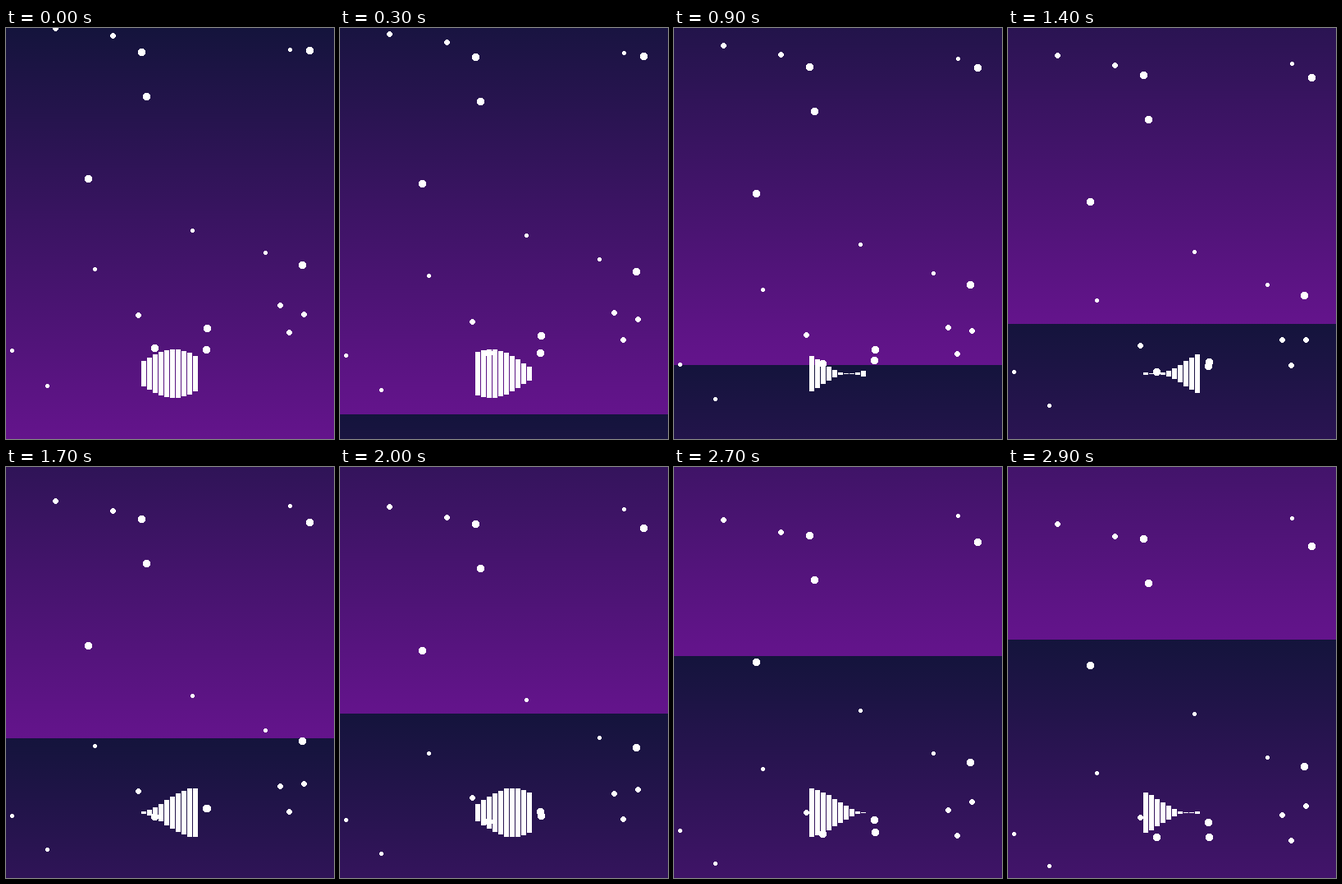
Recreate the animation shown at these times as an HTML page. Size 400 px wide and 500 px high, loop 3 s.

```html
<!DOCTYPE html>
<html lang="en">
<head>
<meta charset="utf-8">
<title>Night sky equalizer</title>
<style>
  html, body { margin: 0; width: 100%; height: 100%; overflow: hidden; background: #14143c; }
  svg { display: block; width: 400px; height: 500px; }
</style>
</head>
<body>
<svg viewBox="0 0 400 500" shape-rendering="crispEdges">
  <defs>
    <linearGradient id="sky" x1="0" y1="0" x2="0" y2="1">
      <stop offset="0" stop-color="rgb(20,20,60)"/>
      <stop offset="1" stop-color="rgb(100,20,140)"/>
    </linearGradient>
  </defs>
  <g id="back">
    <rect width="400" height="500" fill="url(#sky)"/>
    <rect y="500" width="400" height="500" fill="url(#sky)"/>
  </g>
  <g id="stars" fill="#fff"></g>
  <g id="bars" fill="#fff"></g>
</svg>
<script>
const STEP = 100, STEPS = 30;
const BARS = 10, PITCH = 7, MID = 420, SWING = 15;

// by radius: x, start y, fall per step
const STARS = {
  2: [[346, 26.4, 1.23], [227, 246.9, 1.84], [108, 293.6, 2.72],
      [316, 273.6, 2.77], [7, 392.7, 1.86], [50, 435.6, 1.73]],
  3: [[60, 0.4, 2.39], [130, 9.4, 2.59], [334, 337.5, 2.98],
      [363, 348.3, 2.2], [345, 370.5, 2.89], [161, 349.3, 2.65]],
  4: [[165, 29, 2], [171, 83, 2], [100, 183, 2], [181, 389.4, 2.1],
      [370, 27.2, 2.38], [361, 288.7, 2.62], [245, 365.7, 2.92], [244, 391.3, 1.42]]
};

const byId = id => document.getElementById(id);

function add(parent, tag, attrs) {
  const el = document.createElementNS("http://www.w3.org/2000/svg", tag);
  for (const key in attrs) el.setAttribute(key, attrs[key]);
  return parent.appendChild(el);
}

// Pixel disc built from one-pixel rows
function disc(r) {
  let d = "";
  for (let y = -r; y <= r; y++) {
    const w = Math.floor(Math.sqrt((r + 0.5) ** 2 - y * y));
    d += `M${-w} ${y}h${2 * w + 1}v1h${-2 * w - 1}z`;
  }
  return d;
}

const back = byId("back");
const stars = Object.entries(STARS).flatMap(([r, list]) =>
  list.map(([x, y, fall]) => ({ x, y, fall, el: add(byId("stars"), "path", { d: disc(+r) }) })));
const bars = Array.from({ length: BARS }, (_, i) =>
  add(byId("bars"), "rect", { x: 200 + PITCH * (i - BARS / 2), width: PITCH - 1 }));

function draw(n) {
  back.setAttribute("transform", `translate(0 ${-10 * n})`);
  for (const { x, y, fall, el } of stars) {
    el.setAttribute("transform", `translate(${x} ${Math.floor(y + fall * n)})`);
  }
  bars.forEach((el, i) => {
    const h = Math.floor(SWING * (1 + Math.sin(0.3 * (n + i))));
    el.setAttribute("y", MID - h);
    el.setAttribute("height", 2 * h + 1);
  });
}

function tick() {
  draw(Math.floor(performance.now() / STEP) % STEPS);
  requestAnimationFrame(tick);
}
tick();
</script>
</body>
</html>
```
